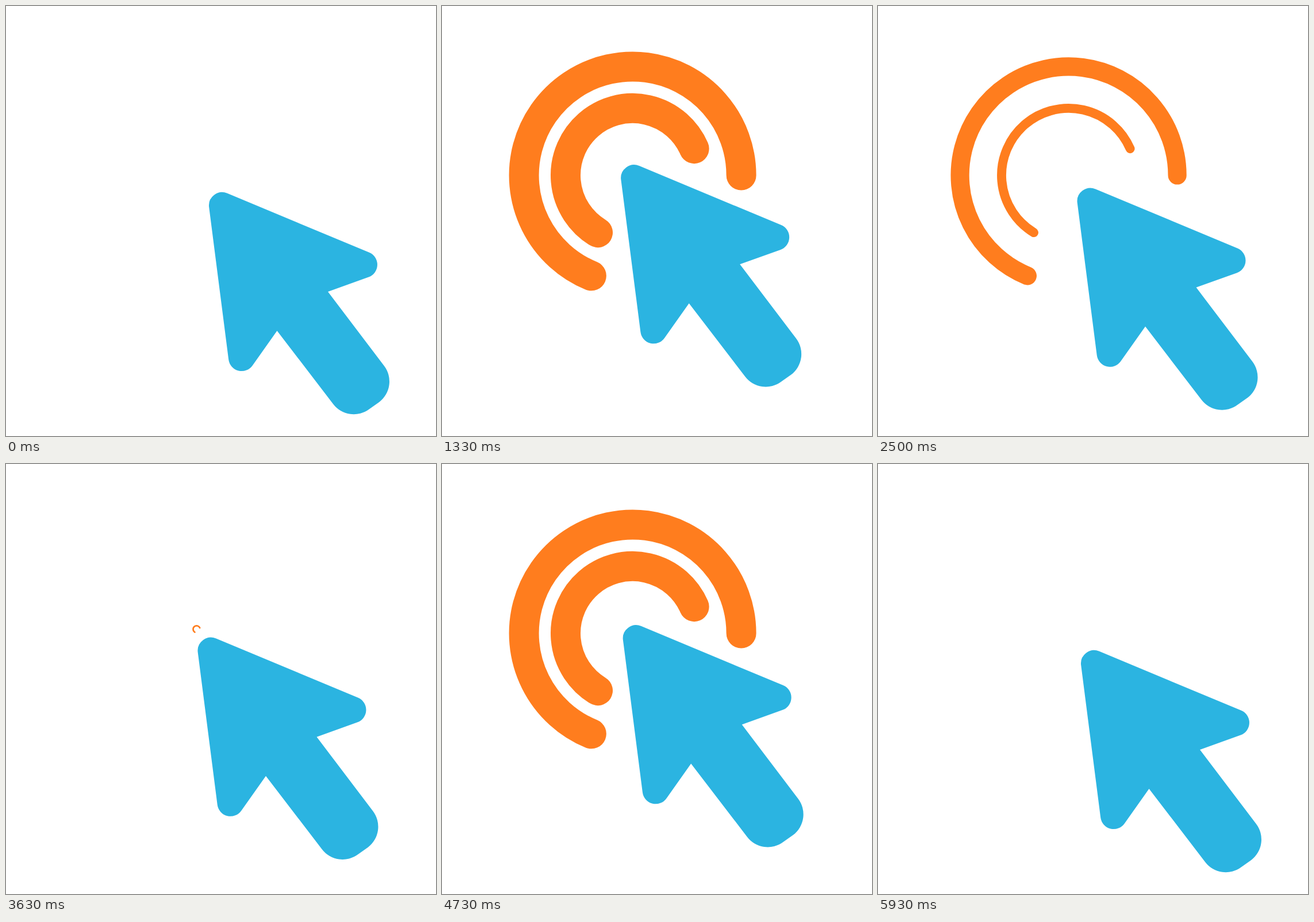
These frames come from a looping animation (748 px wide and 748 px high, 6.01 s). An HTML page:

```html
<!DOCTYPE html>
<html lang="en">
<head>
<meta charset="utf-8">
<title>Click</title>
<style>
  html, body { margin: 0; width: 100%; height: 100%; overflow: hidden; background: #fff; }
  svg { display: block; width: 100vw; height: 100vh; }
  .ring { fill: none; stroke: #ff7d1e; stroke-linecap: round; }
  #cursor { fill: #2bb4e1; }
</style>
</head>
<body>
<svg viewBox="0 0 748 748">
  <path class="ring" id="outer"/>
  <path class="ring" id="inner"/>
  <path id="cursor" d="M353.2 350 A23 23 0 0 1 384.9 325.8 L631.9 428.8 A23 23 0 0 1 630.8 471.6
    L560 497 L657.8 626 A45 45 0 0 1 649.2 689 L632.2 701 A45 45 0 0 1 569 692.2
    L471.5 565 L428.9 625.2 A23 23 0 0 1 387.2 615 Z"/>
</svg>
<script>
  const LOOP = 6010, CYCLE = 3000;
  const CENTER = { x: 331.6, y: 294.5 };
  const ORIGIN = { x: 331.6, y: 287 };   // point the rings grow from
  const STROKE = 52;
  const PUSH = { x: -42.4, y: -48.4, time: 1467 };
  const GROW = 600, SHRINK = 430;

  const rings = [
    { id: 'inner', r: 116.6, from: -23.4, to: 121.3, grow: 600, shrink: 2250 },
    { id: 'outer', r: 189, from: 0, to: 112.3, grow: 667, shrink: 2335 }
  ];

  const byId = id => document.getElementById(id);
  const clamp = v => Math.min(1, Math.max(0, v));

  // Cubic bezier easing with handles (a, 0) and (b, 1)
  const bezier = (a, b) => v => {
    const x = clamp(v);
    let lo = 0, hi = 1;
    for (let i = 0; i < 30; i++) {
      const s = (lo + hi) / 2, q = 1 - s;
      if (3 * a * s * q * q + 3 * b * s * s * q + s * s * s < x) lo = s; else hi = s;
    }
    return x === 0 ? 0 : x === 1 ? 1 : lo * lo * (3 - 2 * lo);
  };
  const glide = bezier(0.333, 0.55);
  const pop = bezier(0.14, 0.2);

  const onRing = (r, deg) => {
    const a = deg * Math.PI / 180;
    return `${CENTER.x + r * Math.cos(a)} ${CENTER.y + r * Math.sin(a)}`;
  };

  for (const ring of rings) {
    ring.el = byId(ring.id);
    ring.el.setAttribute('d',
      `M${onRing(ring.r, ring.to)} A${ring.r} ${ring.r} 0 1 1 ${onRing(ring.r, ring.from)}`);
  }
  const cursor = byId('cursor');

  // Two pictures per 100 ms, held for 30 and 70 ms
  function stepped(t) {
    const held = Math.min(t, 5999);
    return Math.floor(held / 100) * 100 + (held % 100 >= 30 ? 33.4 : 0);
  }

  function draw(t) {
    const now = stepped(t) % CYCLE;

    const push = glide(now / PUSH.time) - glide((now - PUSH.time) / PUSH.time);
    cursor.setAttribute('transform', `translate(${PUSH.x * push} ${PUSH.y * push})`);

    for (const { el, grow, shrink } of rings) {
      const scale = pop((now - grow) / GROW);
      const width = STROKE * (1 - glide((now - shrink) / SHRINK));
      el.setAttribute('visibility', scale > 0 && width > 0 ? 'visible' : 'hidden');
      el.setAttribute('stroke-width', width);
      el.setAttribute('transform',
        `translate(${ORIGIN.x} ${ORIGIN.y}) scale(${scale}) translate(${-ORIGIN.x} ${-ORIGIN.y})`);
    }
  }

  const start = performance.now();
  function tick() {
    draw((performance.now() - start) % LOOP);
    requestAnimationFrame(tick);
  }
  tick();
</script>
</body>
</html>
```
